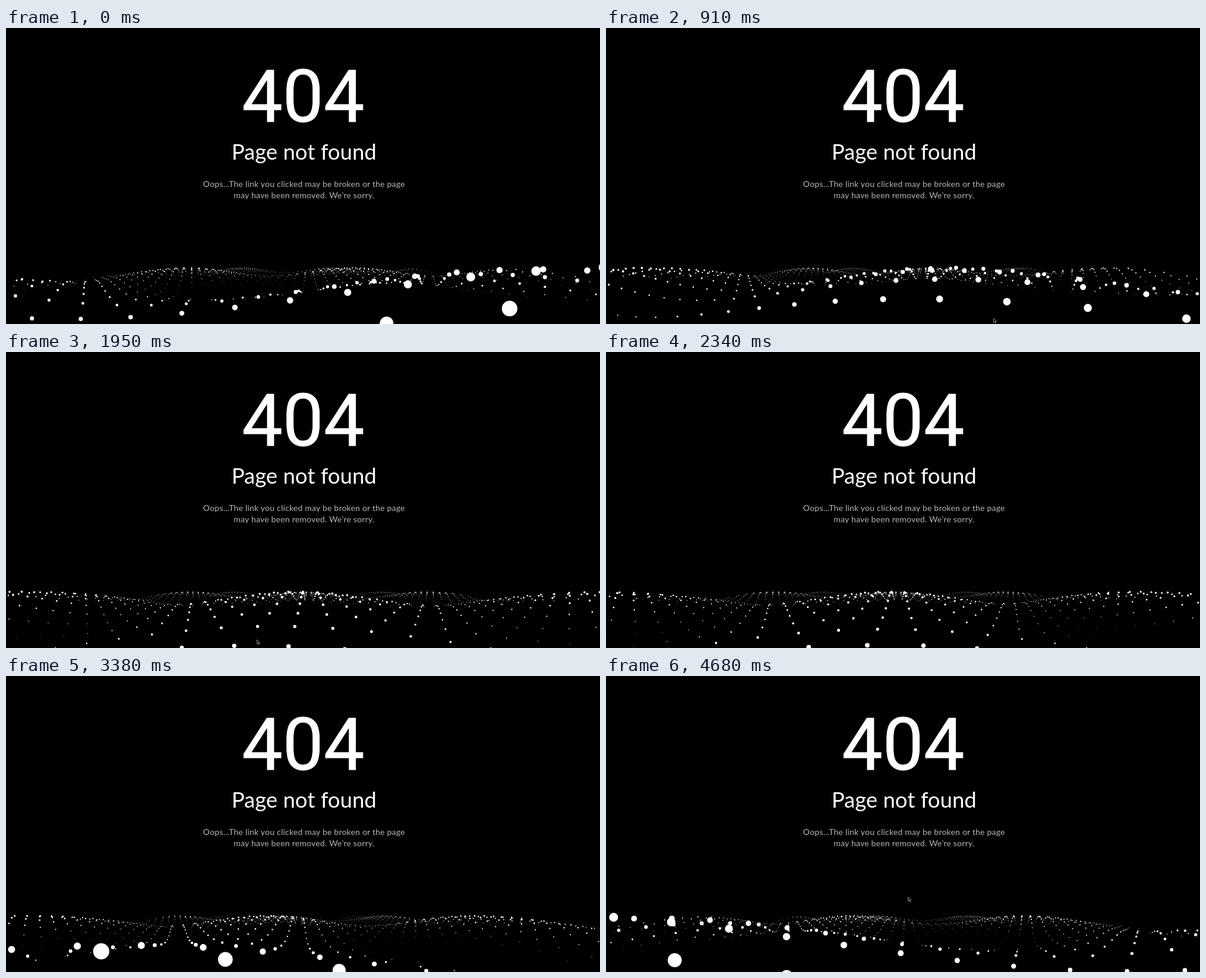
An HTML page with a canvas that plays this animation: 1000x499 px, repeating every 4.81 s.

```html
<!DOCTYPE html>
<html lang="en">
<head>
<meta charset="utf-8">
<title>Page not found</title>
<style>
  html, body { margin: 0; width: 100%; height: 100%; overflow: hidden; background: #000; }
  canvas, svg { position: absolute; left: 0; top: 0; display: block; }
  text { font-family: Lato, sans-serif; text-anchor: middle; fill: #fff; }
  .code { font: 122.5px Roboto, sans-serif; stroke: #fff; stroke-width: .8px; }
  .title { font-size: 36.5px; }
  .note { font-size: 14px; letter-spacing: .21px; fill: #b4b4b4; }
</style>
</head>
<body>
<canvas width="1000" height="499"></canvas>
<svg width="1000" height="499">
  <text class="code" x="500.3" y="158">404</text>
  <text class="title" x="501.7" y="221.5">Page not found</text>
  <text class="note" x="501.8" y="268">Oops...The link you clicked may be broken or the page</text>
  <text class="note" x="501.8" y="287">may have been removed. We’re sorry.</text>
  <path id="cursor" d="M0 0V8.2L2 6.6L3.4 9.4L4.8 8.7L3.5 6H6Z" fill="#111" stroke="#bbb" stroke-width=".8"/>
</svg>
<script>
const ctx = document.querySelector('canvas').getContext('2d');
const cursor = document.getElementById('cursor');

const LOOP = 4810, STEP = 130;
const GRID = 50, FOCAL = 196, CENTER_X = 501.5, CENTER_Y = 423.7;
// Lengths are in units of the grid spacing.
const CAMERA_Y = 0.972, CAMERA_Z = 10;

// time in ms, wave phase, camera x, camera velocity per second
const KEYS = [
  [0, -4.7, 0.305, 2.5],
  [910, -1.43, 1.735, 0.7],
  [1950, 1.53, 0.345, -1.85],
  [2860, 3.4, -0.8, 1.05],
  [3380, 4.65, -0.355, 0.6],
  [4160, 6.42, 0.017, 0.12],
  [4680, 7.64, 0.07, 0.08]
];

const mix = (a, b, u) => a + (b - a) * u;

function hermite(a, b, va, vb, u) {
  const v = 1 - u;
  return v * v * ((1 + 2 * u) * a + u * va) + u * u * ((3 - 2 * u) * b - v * vb);
}

function stateAt(t) {
  let k = 0;
  while (k < KEYS.length - 2 && t >= KEYS[k + 1][0]) k++;
  const [t0, phase0, x0, v0] = KEYS[k], [t1, phase1, x1, v1] = KEYS[k + 1];
  const u = (t - t0) / (t1 - t0), seconds = (t1 - t0) / 1000;
  return {
    phase: mix(phase0, phase1, u),
    cameraX: hermite(x0, x1, v0 * seconds, v1 * seconds, u)
  };
}

function drawWaves({ phase, cameraX }) {
  // The camera always looks at the middle of the grid.
  const yaw = Math.atan2(cameraX, CAMERA_Z);
  const pitch = Math.atan2(CAMERA_Y, Math.hypot(cameraX, CAMERA_Z));
  const cosYaw = Math.cos(yaw), sinYaw = Math.sin(yaw);
  const cosPitch = Math.cos(pitch), sinPitch = Math.sin(pitch);

  ctx.fillStyle = '#000';
  ctx.fillRect(0, 0, 1000, 499);
  ctx.fillStyle = '#fff';
  ctx.beginPath();
  for (let col = 0; col < GRID; col++) {
    for (let row = 0; row < GRID; row++) {
      const wave = Math.sin((col + phase) * 0.3) + Math.sin((row + phase) * 0.5);
      const x = col - GRID / 2 - cameraX;
      const z = CAMERA_Z + GRID / 2 - row;
      const below = CAMERA_Y - wave / 2;
      const side = x * cosYaw + z * sinYaw;
      const ahead = z * cosYaw - x * sinYaw;
      const depth = ahead * cosPitch + below * sinPitch;
      if (depth < 0.01) continue;

      const zoom = FOCAL / depth;
      const sx = CENTER_X + side * zoom;
      const sy = CENTER_Y + (below * cosPitch - ahead * sinPitch) * zoom;
      const radius = (4 + 2 * wave) * 0.01 * zoom;
      if (sx < -30 || sx > 1030 || sy > 530) continue;
      ctx.moveTo(sx + radius, sy);
      ctx.arc(sx, sy, radius, 0, 2 * Math.PI);
    }
  }
  ctx.fill();
  ctx.clearRect(0, 0, 3, 499);
}

function placeCursor(t) {
  const sweeping = t >= 780 && t <= 2080, resting = t >= 4160;
  const u = (t - 910) / 1040;
  const x = resting ? 508.5 : mix(652.5, 422.5, u);
  const y = resting ? 372.5 : mix(489.5, 485, u);
  cursor.setAttribute('visibility', sweeping || resting ? 'visible' : 'hidden');
  cursor.setAttribute('transform', `translate(${x} ${y}) scale(.85)`);
}

function frame() {
  const t = Math.floor(performance.now() % LOOP / STEP) * STEP;
  drawWaves(stateAt(t));
  placeCursor(t);
  requestAnimationFrame(frame);
}
frame();
</script>
</body>
</html>
```
